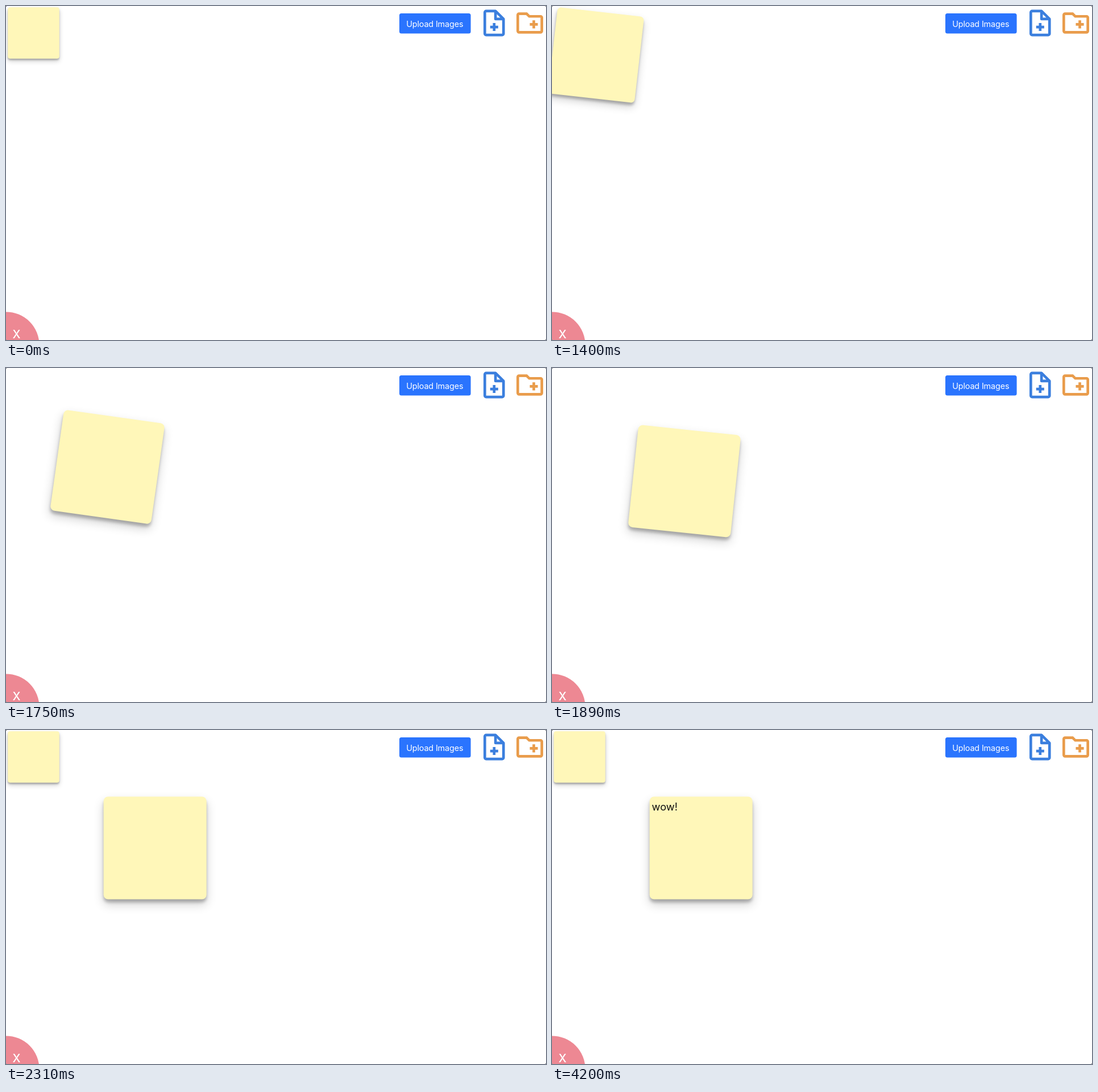
An HTML page for the animation above (5040 ms loop, 950 by 589 pixels).

```html
<!DOCTYPE html>
<html lang="en">
<head>
<meta charset="utf-8">
<title>Sticky note board</title>
<style>
  html, body { margin: 0; width: 100%; height: 100%; overflow: hidden; background: #333; }
  #board { position: absolute; left: 0; top: 0; width: 950px; height: 589px; overflow: hidden; background: #fff; border-radius: 2px; }
  .note {
    position: absolute; left: -90.5px; top: -90.5px; width: 181px; height: 181px;
    border-radius: 8px; background: #fff7b9;
    box-shadow: 0 9px 18px rgba(0,0,0,.19), 0 5.4px 5.4px rgba(0,0,0,.23);
  }
  svg { position: absolute; left: 0; top: 0; }
  text { font-family: Inter, "Liberation Sans", sans-serif; fill: #fff; }
  #label { font-size: 14.4px; letter-spacing: -.01em; text-anchor: middle; }
  #close { font-size: 20px; font-weight: 500; text-anchor: middle; }
  #typed { font-size: 18.3px; fill: #111; }
</style>
</head>
<body>
<div id="board">
  <div class="note" id="stack"></div>
  <div class="note" id="note"></div>
  <svg width="950" height="589" viewBox="0 0 950 589">
    <rect x="692" y="13" width="125.6" height="35.6" rx="3.6" fill="#2a74fe"/>
    <text id="label" x="754.3" y="36.8">Upload Images</text>

    <g transform="translate(830.6 1.8) scale(2.35)" fill="#3b7fde">
      <path fill-rule="evenodd" d="M6 2h7q.4 0 .7.3l6 6q.3.3.3.7v11a2 2 0 0 1-2 2H6a2 2 0 0 1-2-2V4a2 2 0 0 1 2-2z
        M6 4v16h12V10h-5a1 1 0 0 1-1-1V4z M14 5.4V8h2.6z"/>
      <path d="M11 12h2v2h2v2h-2v2h-2v-2H9v-2h2z"/>
    </g>
    <g transform="translate(893.3 1.8) scale(2.35)" fill="#e99c4b">
      <path fill-rule="evenodd" d="M4 4h6l2 2h8a2 2 0 0 1 2 2v10a2 2 0 0 1-2 2H4a2 2 0 0 1-2-2V6a2 2 0 0 1 2-2z
        M4 6v12h16V8h-8.8l-2-2z"/>
      <path d="M14 10h2v2h2v2h-2v2h-2v-2h-2v-2h2z"/>
    </g>

    <circle cx="0" cy="598" r="58.6" fill="#ed8893"/>
    <text id="close" x="18.5" y="586">X</text>

    <text id="typed" x="175.6" y="142.3"></text>
    <rect id="caret" y="125" width="2" height="23" fill="#111"/>
  </svg>
</div>
<script>
const LOOP = 5040, STEP = 70, DROP = 2170;
const CARET_ON = 3080, CARET_OFF = 4200;

// time, centre x, centre y, angle, scale
const drag = [
  [1120, 48, 47, 0, .5],
  [1330, 66, 71, 5, .78],
  [1470, 88, 101, 8, .91],
  [1610, 121.3, 139.4, 8.6, .965],
  [1750, 178, 174, 8, .99],
  [1890, 232.5, 199, 6, 1],
  [2030, 255, 205.5, 3, 1],
  [DROP, 261.7, 207.5, 0, 1]
];
const typing = [[0, ""], [3290, "w"], [3430, "wo"], [3570, "wow"], [3710, "wow!"]];

const $ = id => document.getElementById(id);
const stack = $("stack"), note = $("note"), typed = $("typed"), caret = $("caret");

function place(el, [x, y, angle, scale]) {
  el.style.transform = `translate(${x}px, ${y}px) rotate(${angle}deg) scale(${scale})`;
}

function pose(t) {
  const last = drag.length - 1;
  if (t <= drag[0][0]) return drag[0].slice(1);
  if (t >= drag[last][0]) return drag[last].slice(1);
  const i = drag.findIndex(k => k[0] > t);
  const a = drag[i - 1], b = drag[i];
  const p = (t - a[0]) / (b[0] - a[0]);
  return a.slice(1).map((v, j) => v + (b[j + 1] - v) * p);
}

function draw(now) {
  const t = Math.floor((now % LOOP) / STEP) * STEP;
  place(note, pose(t));
  stack.style.visibility = t >= DROP ? "visible" : "hidden";

  const text = typing.filter(k => k[0] <= t).pop()[1];
  if (typed.textContent !== text) typed.textContent = text;
  const focused = t >= CARET_ON && t < CARET_OFF;
  caret.style.visibility = focused ? "visible" : "hidden";
  if (focused) caret.setAttribute("x", 175.2 + (text ? typed.getComputedTextLength() : 0));
}

place(stack, [48, 47, 0, .5]);
const start = performance.now();
function tick() {
  draw(performance.now() - start);
  requestAnimationFrame(tick);
}
tick();
</script>
</body>
</html>
```
